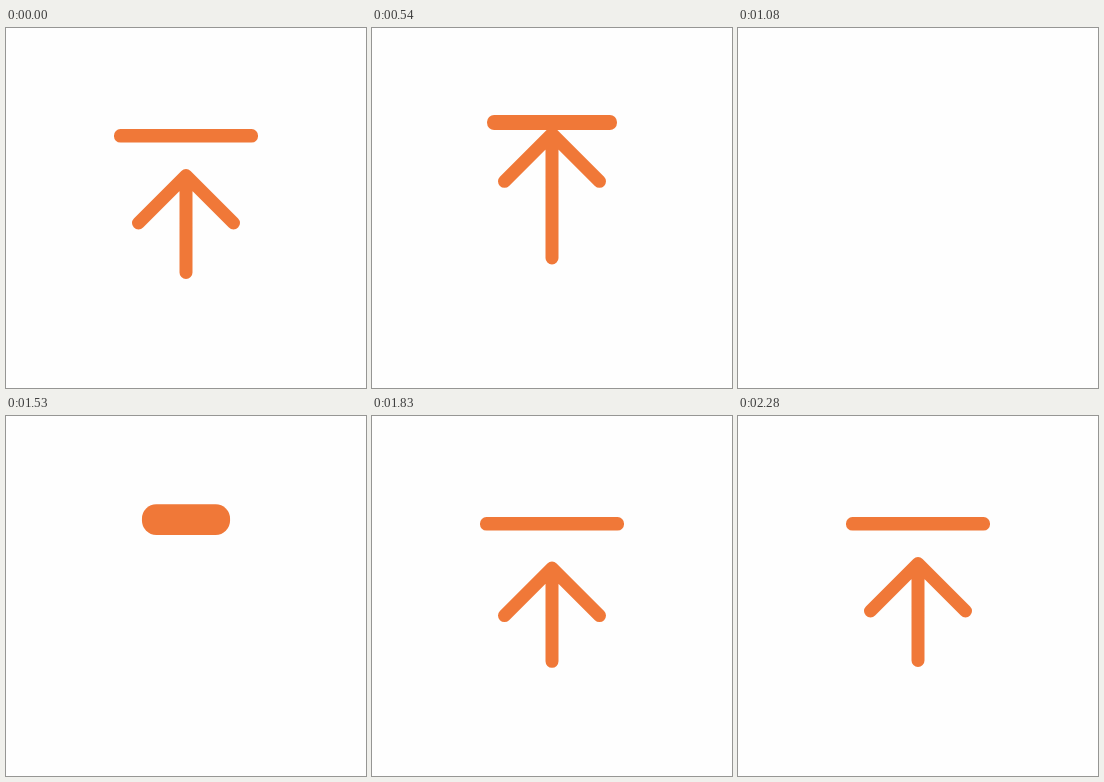
These frames come from a looping animation (360 px wide and 360 px high, 2730 ms). An HTML page:

```html
<!DOCTYPE html>
<html lang="en">
<head>
<meta charset="utf-8">
<title>Upload arrow</title>
<style>
  html, body { margin: 0; width: 100%; height: 100%; overflow: hidden; background: #fefefe; }
  svg { display: block; width: 100%; height: 100%; }
</style>
</head>
<body>
<svg viewBox="0 0 360 360">
  <g fill="#f07838" stroke="#f07838" stroke-width="13" stroke-linecap="round" stroke-linejoin="round">
    <path id="arrow" fill="none"/>
    <rect id="bar" stroke="none"/>
    <path id="sparks" fill="none"/>
  </g>
</svg>
<script>
const LOOP = 2730, STEP = 30, HALF = 1200;
const CX = 180, BAR_Y = 107.8, BALL_Y = 101, TIP_Y = 147.5, TAIL_Y = 244.5, WING = 47.5;
const [arrow, bar, sparks] = ['arrow', 'bar', 'sparks'].map(id => document.getElementById(id));

const mix = (a, b, u) => a + (b - a) * u;
const progress = (t, from, to) => Math.min(1, Math.max(0, (t - from) / (to - from)));
const smooth = (t, from, to) => { const u = progress(t, from, to); return u * u * (3 - 2 * u); };
const easeIn = (t, from, to) => progress(t, from, to) ** 3;
const easeOut = (t, from, to) => 1 - (1 - progress(t, from, to)) ** 4;
const bump = (t, from, to) => Math.sin(Math.PI * progress(t, from, to));

function setAll(el, attrs) {
  for (const name in attrs) el.setAttribute(name, attrs[name]);
}

// The bar gathers into a ball, pops, and later unrolls from a ball again.
function drawBar(t) {
  const leaving = t < HALF;
  const round = leaving ? smooth(t, 490, 690) : 1 - smooth(t, 1440, 1655);
  const size = leaving ? 1 - smooth(t, 690, 780) : smooth(t, 1350, 1470);
  const w = size * mix(144, 54, round);
  const h = size * mix(13.5, 52, round ** 1.7);
  const y = mix(BAR_Y, BALL_Y, round) - 12.2 * bump(t, 450, 630);
  setAll(bar, { x: CX - w / 2, y: y - h / 2, width: w, height: h, rx: h * 0.47 });
}

// The arrow is drawn into the ball tip first, then drops out and sags before it settles.
function drawArrow(t) {
  const leaving = t < HALF;
  const drop = smooth(t, 1560, 1860);
  const sag = leaving ? 0 : 1 - smooth(t, 1890, 2250);
  const tip = mix(TIP_Y + 6 * sag, BALL_Y, leaving ? smooth(t, 300, 600) : 1 - drop);
  const tail = mix(TAIL_Y + 5 * sag, BALL_Y, leaving ? easeIn(t, 435, 660) : 1 - drop);
  const span = WING * (leaving ? 1 - smooth(t, 540, 660) : smooth(t, 1560, 1740));
  setAll(arrow, {
    d: `M${CX - span} ${tip + span}L${CX} ${tip}L${CX + span} ${tip + span}M${CX} ${tip}V${tail}`,
    visibility: t >= 690 && t <= 1560 ? 'hidden' : 'visible'
  });
}

function spark(side, t) {
  const angle = side * Math.PI / 4, tilt = Math.abs(side);
  const reach = 87.5 * (1 + 0.055 * tilt);
  const point = u => {
    const r = reach * u;
    return `${CX + 1.2 * tilt + r * Math.sin(angle)} ${112.5 - r * Math.cos(angle)}`;
  };
  return `M${point(easeOut(t, 710, 1020))}L${point(easeOut(t, 660, 1020))}`;
}

function drawSparks(t) {
  setAll(sparks, {
    d: [-1, 0, 1].map(side => spark(side, t)).join(''),
    'stroke-width': t > 660 ? 13 * (1 - smooth(t, 840, 1020)) : 0
  });
}

const start = performance.now();
function frame() {
  const elapsed = (performance.now() - start) % LOOP;
  const t = Math.floor(elapsed / STEP) * STEP;
  drawBar(t);
  drawArrow(t);
  drawSparks(t);
  requestAnimationFrame(frame);
}
frame();
</script>
</body>
</html>
```
